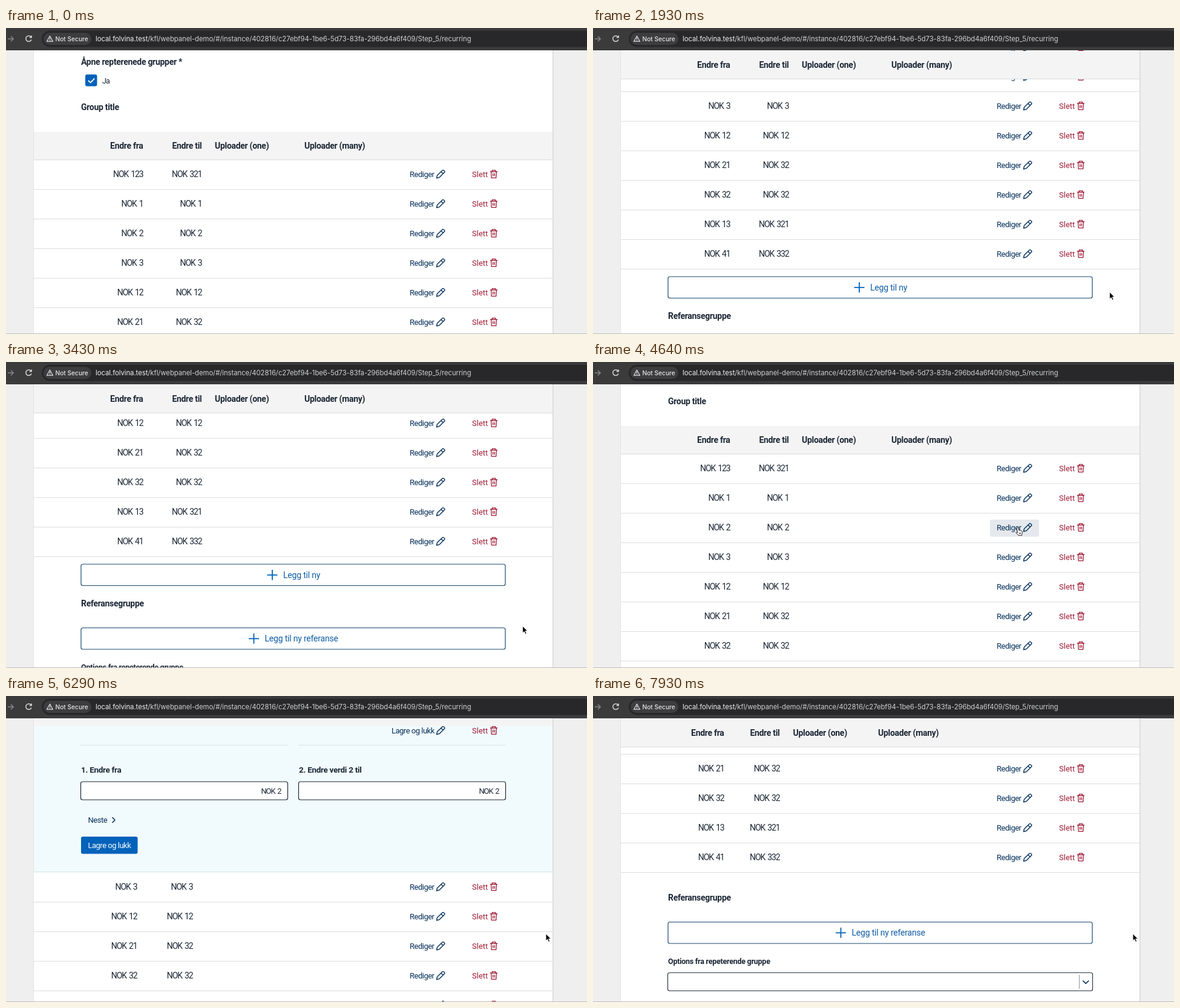
Animation of 960 by 507 pixels, one loop 8000 ms. Source, as an HTML page:

```html
<!DOCTYPE html>
<html lang="nb">
<head>
<meta charset="utf-8">
<style>
  html, body { margin: 0; width: 100%; height: 100%; overflow: hidden; background: #efefef; }
  svg { display: block; width: 960px; height: 507px; }
  text { font-family: Roboto, "Open Sans", sans-serif; white-space: pre; }
  .ui { font-family: Inter, "Noto Sans", sans-serif; }
  .sum { word-spacing: 1.7px; }
</style>
</head>
<body>
<svg id="stage" viewBox="0 0 960 507"></svg>
<script>
const LOOP = 8000, OPEN_AT = 5360, POINTER_AT = 930;
const INK = '#1c2735', NAVY = '#06305a', RED = '#9f1c36', BLUE = '#0062ba', LINE = '#dcdee1';
const ROW = 49, FIRST = 242, GROWTH = 210, STICK = 134;
const values = [[123, 321], [1, 1], [2, 2], [3, 3], [12, 12], [21, 32], [32, 32], [13, 321], [41, 332]];
const closedCols = [226.5, 323.5, 345, 493], openCols = [216.5, 308.5, 330.5, 471];

// [time, value...] entries, joined by straight segments
const scrollKeys = [[1000, 0], [1290, 107], [2640, 429], [2900, 429], [3430, 337],
  [4430, 66], [5700, 66], [6290, 283], [7930, 577]];
const pointerKeys = [[4050, 853.5, 437.5], [4500, 698.5, 273.5], [5450, 698.5, 273.5], [5950, 892, 394]];

// Text, centred vertically on y
const text = (x, y, s, o = {}) => {
  const { size = 14, weight = 400, gap = 0, fill = INK, anchor = 'start', cls = '' } = o;
  return `<text class="${cls}" x="${x}" y="${y + size * .36}" font-size="${size}" font-weight="${weight}"
    letter-spacing="${gap}" fill="${fill}" text-anchor="${anchor}">${s}</text>`;
};
const bold = (x, y, s, size = 14, anchor) => text(x, y, s, { size, weight: 700, gap: size < 13 ? -.25 : -.3, anchor });
const rect = (x, y, w, h, fill, more = '') => `<rect x="${x}" y="${y}" width="${w}" height="${h}" fill="${fill}" ${more}/>`;
const path = (d, stroke, width = 1.4, more = '') =>
  `<path d="${d}" fill="none" stroke="${stroke}" stroke-width="${width}" stroke-linejoin="round" ${more}/>`;
const rule = (x1, x2, y, color = LINE) => path(`M${x1} ${y}H${x2}`, color, 1);
const box = (x, y, w, h, stroke, fill = '#fff') => rect(x, y, w, h, fill, `rx="3" stroke="${stroke}" stroke-width="1.2"`);
const amount = (x, y, n, size = 14) => text(x, y, 'NOK ' + n, { size, gap: -1.1, anchor: 'end', cls: 'sum' });

function actions(y, label, x) {
  return text(x, y, label, { size: 13, gap: -.5, fill: NAVY }) +
    text(770, y, 'Slett', { size: 13, fill: RED }) +
    `<g transform="translate(0 ${y})">` +
    path('M711.5 6.7l1-4.5 8.5-8.3a1.5 1.5 0 0 1 2.2 0l1.2 1.2a1.5 1.5 0 0 1 0 2.2l-8.3 8.3zM718.8-4l3.4 3.4', NAVY) +
    path('M800-4h12M803.3-4v-2.3h5.4V-4M801.6-4l.6 10.3h7.6l.6-10.3M804.7-1.2v4.8M807.3-1.2v4.8', RED, 1.3) + '</g>';
}

function rows(cols, open) {
  return values.map(([from, to], i) => {
    if (open && i === 2) return '';
    const y = FIRST + i * ROW + (open && i > 2 ? GROWTH : 0);
    return amount(cols[0], y, from) + amount(cols[1], y, to) + actions(y, 'Rediger', 667) + rule(46, 903, y + 25.5);
  }).join('');
}

const header = cols => rect(46, 172, 857, 46, '#f4f4f5') + rule(46, 903, 218.5, '#d9dbde') +
  ['Endre fra', 'Endre til', 'Uploader (one)', 'Uploader (many)']
    .map((s, i) => bold(cols[i], 194.5, s, 14, i < 2 ? 'end' : 'start')).join('');

const addButton = (y, plusX, label) => box(124, y, 701, 35.5, '#1b4a70') +
  path(`M${plusX - 8.5} ${y + 17.8}h17m-8.5-8.5v17`, BLUE, 1.8) +
  text(plusX + 18, y + 17.8, label, { gap: -.2, fill: '#0e5ca5' });

const intro = bold(124, 55.5, 'Åpne repterenede grupper *') +
  rect(131, 77, 19.5, 19.5, BLUE, 'rx="3"') + path('M136 87l3.6 3.6 6.6-7', '#fff', 1.8) +
  text(159, 87, 'Ja', { size: 12.5, gap: -.9 }) + bold(124, 131, 'Group title');

const tail = bold(124, 737, 'Referansegruppe') + addButton(777.5, 409.5, 'Legg til ny referanse') +
  bold(124, 842, 'Options fra repeterende gruppe', 12.5) + box(123.5, 861.5, 702, 30, '#2b3746') +
  path('M803.5 865v23', '#8b939c', 1) + path('M809.3 874.5l5 4.8 5-4.8', NAVY, 1.6) +
  bold(124, 920, 'Options fra repeterende gruppe med dynamiske uttrykk', 12.5);

const field = (x, label) => rule(x, x + 342, 364.5, '#d9e3e8') + bold(x + .5, 405, label, 13.5) +
  box(x, 425, 342, 30, INK) + amount(x + 331, 440, 2, 13);

const editor = rect(46, 316, 857, 259, '#f1fbfe') + rule(46, 903, 574.5, '#d2e2e9') +
  `<g id="editHover">${rect(625, 327, 112, 28.5, '#dfe9f0', 'rx="3"')}</g>` +
  actions(340, 'Lagre og lukk', 637) + field(123.5, '1. Endre fra') + field(483.5, '2. Endre verdi 2 til') +
  text(135.5, 488.5, 'Neste', { size: 13, gap: -.5, fill: NAVY }) + path('M175.5 484l4.5 4.5-4.5 4.5', NAVY, 1.6) +
  rect(124, 516, 93.5, 28.5, BLUE, 'rx="3"') + text(135.5, 530, 'Lagre og lukk', { size: 13, gap: -.5, fill: '#fff' });

const browserBar = rect(0, 0, 960, 37, '#3b3b3c') + rect(59, 4.5, 940, 27, '#28282a', 'rx="13.5"') +
  rect(62, 8, 79, 20, '#3d3d3f', 'rx="10"') +
  path('M3 18h9m-4-4.2l4.3 4.2-4.3 4.2', '#88898b') +
  path('M41.6 15.2a4.7 4.7 0 1 0 .4 4M42.2 12.4v3.4h-3.4', '#d6d6d7', 1.5) +
  path('M72.5 13.2l5 9h-10zM72.5 16.2v3M72.5 20v1', '#e2e2e3', 1.2) +
  text(81.5, 18, 'Not Secure', { size: 10.2, weight: 500, fill: '#e6e6e7', cls: 'ui' }) +
  text(148, 18, 'local.folvina.test<tspan fill="#cfd0d2">/kfl/webpanel-demo/#/instance/402816/' +
    'c27ebf94-1be6-5d73-83fa-296bd4a6f409/Step_5/recurring</tspan>', { size: 11.3, gap: -.04, fill: '#f2f2f3', cls: 'ui' });

const arrow = '<path d="M0 0v11.6l2.7-2.5 1.9 4.3 2-.9-1.9-4.2h3.7z" fill="#000" stroke="#fff" stroke-width=".9"/>';
const hand = '<path d="M2.3 1.2q1.2-1 2 .5l1.2 4q.9-.8 1.7 0 1-.6 1.7.3 1.3-.3 1.6 1l.4 3-1 3.8H4.6L.4 9.3q-.3-1.4 1.4-1l1.6.9-1.8-6.5q-.1-1 .7-1.5zM6 9.2v2.5M8 9v2.5" ' +
  'fill="#fff" stroke="#222" stroke-width="1"/>';

const stage = document.getElementById('stage');
stage.innerHTML = `<clipPath id="below">${rect(46, 50, 857, 457, '#000')}</clipPath>` +
  rect(0, 0, 960, 507, '#efefef') + rect(45, 37, 860, 470, '#e4e4e4') + rect(46, 37, 858, 470, '#d8d8d9') +
  rect(46, 37, 857, 470, '#fff') +
  `<g id="page">${intro}<g id="shut">${rect(656, 327, 81, 28.5, '#e5e9ee', 'id="rowHover" rx="3"')}
    ${rows(closedCols, false)}${addButton(672, 440, 'Legg til ny')}</g>
    <g id="open">${rows(openCols, true)}</g><g id="tail">${tail}</g></g>
  <g id="head"><g id="headShut">${header(closedCols)}</g><g id="headOpen">${header(openCols)}</g></g>
  <g id="editClip" clip-path="url(#below)"><g id="editor">${editor}</g></g>` +
  rule(0, 960, 506.5, '#bcbcbd') + browserBar +
  `<g id="pointer"><g id="arrow">${arrow}</g><g id="hand">${hand}</g></g>`;

const el = id => document.getElementById(id);
const show = (id, on) => el(id).style.display = on ? '' : 'none';
const move = (id, x, y) => el(id).setAttribute('transform', `translate(${x} ${y})`);

function at(keys, t) {
  const i = keys.findIndex(k => k[0] > t);
  if (i < 0) return keys[keys.length - 1].slice(1);
  if (i === 0) return keys[0].slice(1);
  const [a, b] = [keys[i - 1], keys[i]], u = (t - a[0]) / (b[0] - a[0]);
  return a.slice(1).map((v, j) => v + (b[j + 1] - v) * u);
}

function draw(now) {
  const t = now % LOOP, open = t >= OPEN_AT;
  const scroll = Math.round(at(scrollKeys, t)[0]), [px, py] = at(pointerKeys, t);
  const docY = py + scroll, over = px < 732 && docY > 326 && docY < 355;
  move('page', 0, -scroll);
  move('head', 0, Math.max(-scroll, -STICK));
  move('editor', 0, -scroll);
  move('tail', 0, open ? 174 : 0);
  move('pointer', px, py);
  for (const id of ['shut', 'headShut']) show(id, !open);
  for (const id of ['open', 'headOpen', 'editClip']) show(id, open);
  show('rowHover', over);
  show('editHover', over);
  show('pointer', t >= POINTER_AT);
  show('hand', over);
  show('arrow', !over);
  requestAnimationFrame(draw);
}
draw(performance.now());
</script>
</body>
</html>
```
